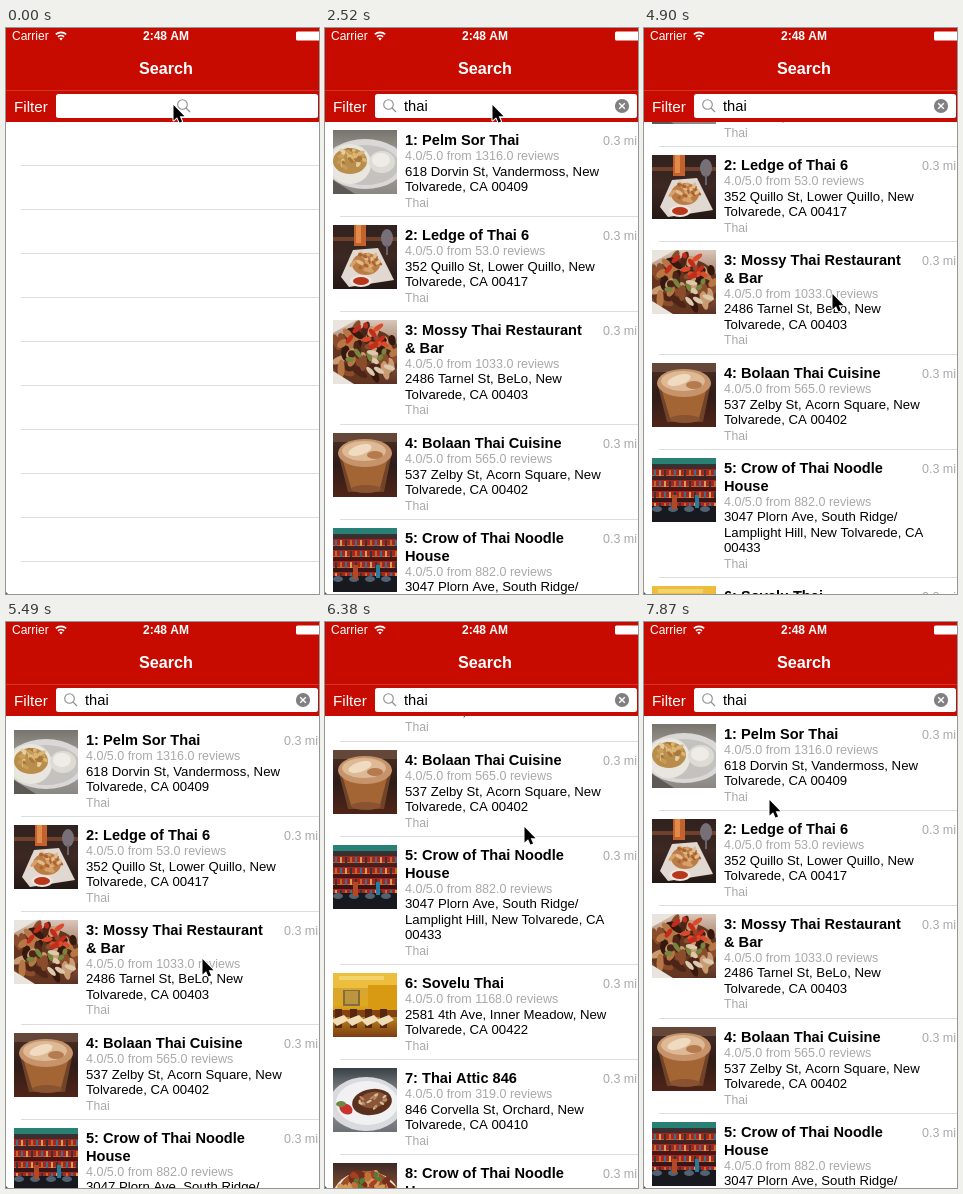
These frames come from a looping animation (313 by 566 pixels, 8000 ms). An HTML page with a canvas:

```html
<!DOCTYPE html>
<html lang="en">
<head>
<meta charset="utf-8">
<title>Search</title>
<style>
html, body { margin: 0; width: 100%; height: 100%; overflow: hidden; background: #fff; }
canvas { display: block; width: 313px; height: 566px; }
</style>
</head>
<body>
<canvas id="stage"></canvas>
<script>
const W = 313, H = 566, LOOP = 8000, TOP = 94;
const RED = '#c80b00', GRAY = '#a9a9ac', LINE = '#dddde0';
const FACE = '"Liberation Sans", Arial, sans-serif';
const canvas = document.getElementById('stage');
const dpr = window.devicePixelRatio || 1;
canvas.width = W * dpr;
canvas.height = H * dpr;
const g = canvas.getContext('2d');

function text(s, x, y, size, color, bold, align) {
  g.font = (bold ? 'bold ' : '') + size + 'px ' + FACE;
  g.fillStyle = color;
  g.textAlign = align || 'left';
  g.fillText(s, x, y);
}
function rect(c, x, y, w, h) {
  g.fillStyle = c;
  g.fillRect(x, y, w, h);
}
function oval(c, x, y, rx, ry, turn) {
  g.fillStyle = c;
  g.beginPath();
  g.ellipse(x, y, rx, ry === undefined ? rx : ry, turn || 0, 0, 7);
  g.fill();
}
function poly(c, ...p) {
  g.fillStyle = c;
  g.beginPath();
  for (let i = 0; i < p.length; i += 2) g.lineTo(p[i], p[i + 1]);
  g.closePath();
  g.fill();
}
function shade(...colors) {
  const f = g.createLinearGradient(0, 0, 0, 64);
  colors.forEach((c, i) => f.addColorStop(i / (colors.length - 1), c));
  rect(f, 0, 0, 64, 64);
}
// Scatters small flat dabs inside an ellipse.
function dabs(seed, n, colors, cx, cy, rx, ry, size) {
  const rnd = () => (seed = (seed * 16807) % 2147483647) / 2147483647;
  for (let i = 0; i < n; i++) {
    const a = rnd() * 6.28, r = Math.sqrt(rnd());
    oval(colors[i % colors.length], cx + Math.cos(a) * r * rx, cy + Math.sin(a) * r * ry,
      size * (0.6 + rnd()), size * 0.6, rnd() * 3);
  }
}

const photos = [
  () => {
    shade('#77736d', '#a9a5a0', '#8b8783');
    oval('#d9d8d6', 32, 34, 40, 25);
    oval('#c4c2bf', 32, 35, 34, 20);
    oval('#e9e6df', 17, 34, 21, 20);
    oval('#b98d4c', 17, 31, 17, 13);
    dabs(7, 30, ['#d9b674', '#e4cfa0', '#a9783a', '#c99c57'], 17, 30, 15, 11, 3);
    oval('#dedbd4', 49, 32, 13, 11);
    oval('#eeece7', 48, 30, 9, 7);
    poly('#5d5955', 0, 50, 22, 64, 0, 64);
  },
  () => {
    shade('#30221f', '#3d2822', '#241815');
    rect('#70402a', 0, 12, 64, 4);
    rect('#c3622c', 21, 0, 12, 21);
    rect('#e18b4a', 23, 0, 5, 18);
    oval('#777078', 54, 13, 6, 9);
    rect('#68636a', 53, 20, 2, 10);
    poly('#e0d8d1', 20, 25, 45, 23, 61, 55, 16, 62, 8, 52);
    oval('#bc7c46', 33, 39, 14, 11);
    dabs(19, 24, ['#d7a069', '#e2bd89', '#ad6432'], 33, 38, 13, 11, 3);
    oval('#eee4dd', 28, 56, 11, 6);
    oval('#b8371b', 28, 56, 8, 4);
  },
  () => {
    shade('#d9c7ba', '#9a6d51', '#5c3022');
    oval('#64351f', 32, 36, 35, 28);
    dabs(23, 66, ['#8a4c2b', '#b67745', '#4d2518', '#c99b72', '#36180f'], 32, 34, 32, 27, 6);
    dabs(41, 11, ['#c52b1b', '#db4a2b'], 31, 20, 26, 15, 4);
    dabs(31, 10, ['#dcc8ad', '#77853e'], 36, 41, 22, 18, 4);
    poly('#eae4df', 0, 51, 21, 64, 0, 64);
    poly('#eae4df', 0, 0, 23, 0, 0, 13);
  },
  () => {
    shade('#4b3026', '#2f1d18', '#502418');
    rect('#65473a', 0, 0, 64, 9);
    poly('#71442a', 5, 19, 59, 19, 51, 59, 15, 59);
    poly('#a46534', 10, 28, 54, 28, 47, 55, 18, 55);
    oval('#c7936a', 32, 20, 27, 14);
    oval('#ddb995', 31, 18, 22, 10);
    oval('#f0dac0', 27, 17, 12, 5, -0.3);
    oval('#b67a4f', 42, 22, 8, 4);
    oval('#895332', 33, 56, 15, 4);
  },
  () => {
    shade('#34393a', '#4a1413', '#15161b');
    rect('#298176', 0, 0, 64, 6);
    for (let y = 11; y < 46; y += 11) {
      rect('#a52521', 0, y, 64, 6);
      rect('#d25632', 0, y + 6, 64, 1);
      for (let x = 2; x < 64; x += 5)
        rect(['#be682c', '#3c7189', '#d2a056', '#37362d'][(x + y) % 4], x, y + 1, 2, 6);
    }
    rect('#17191e', 0, 48, 64, 16);
    for (let x = 5; x < 64; x += 16) oval('#536273', x, 51, 5, 3);
    rect('#b14a24', 20, 37, 5, 14);
    rect('#287ca0', 43, 37, 4, 13);
  },
  () => {
    shade('#d3a044', '#dfa91f', '#7c3d13');
    rect('#edbd3e', 0, 0, 64, 15);
    rect('#f3d36c', 6, 3, 45, 4);
    rect('#806e3e', 10, 17, 17, 16);
    rect('#bc963e', 12, 18, 13, 13);
    rect('#d99a13', 35, 12, 29, 29);
    rect('#844211', 0, 37, 64, 7);
    for (let x = 2; x < 62; x += 15) {
      rect('#57280f', x, 36, 7, 19);
      poly('#f0ddb5', x - 4, 47, x + 9, 42, x + 14, 47, x + 2, 53);
    }
  },
  () => {
    shade('#374045', '#9c9c9e', '#6d7175');
    oval('#d9dade', 33, 36, 37, 27);
    oval('#f1f1f3', 34, 35, 31, 22);
    oval('#5b301d', 39, 34, 20, 13, -0.15);
    oval('#8a5638', 40, 32, 14, 8, -0.15);
    dabs(13, 14, ['#b98b65', '#dac2a0'], 40, 32, 14, 8, 2);
    oval('#c8322f', 13, 41, 7, 5, 0.5);
    oval('#6f8741', 8, 36, 5, 3);
  },
  () => {
    shade('#3e2926', '#8f5631', '#dfd8cd');
    oval('#e8e4dc', 33, 36, 34, 28);
    oval('#9e4e25', 33, 28, 27, 20);
    dabs(37, 35, ['#bf7237', '#d59b5b', '#762f1b'], 33, 26, 26, 18, 5);
    dabs(11, 9, ['#557b36', '#a83f25'], 33, 16, 18, 9, 4);
  }
];

const rows = [
  ['Pelm Sor Thai', '1316', '618 Dorvin St, Vandermoss, New|Tolvarede, CA 00409'],
  ['Ledge of Thai 6', '53', '352 Quillo St, Lower Quillo, New|Tolvarede, CA 00417'],
  ['Mossy Thai Restaurant|& Bar', '1033', '2486 Tarnel St, BeLo, New|Tolvarede, CA 00403'],
  ['Bolaan Thai Cuisine', '565', '537 Zelby St, Acorn Square, New|Tolvarede, CA 00402'],
  ['Crow of Thai Noodle|House', '882', '3047 Plorn Ave, South Ridge/|Lamplight Hill, New Tolvarede, CA|00433'],
  ['Sovelu Thai', '1168', '2581 4th Ave, Inner Meadow, New|Tolvarede, CA 00422'],
  ['Thai Attic 846', '319', '846 Corvella St, Orchard, New|Tolvarede, CA 00410'],
  ['Crow of Thai Noodle|House', '417', '729 Brindel St, Orchard, New|Tolvarede, CA 00408']
].map(([name, reviews, address], i) => {
  const title = (i + 1 + ': ' + name).split('|');
  const lines = address.split('|');
  const height = Math.floor(95 + (title.length - 1) * 17.8 + (lines.length - 2) * 15.5 + 0.3);
  return { title, reviews, lines, height };
});

// Pose keys: time, list offset, pointer x, pointer y.
const keys = [
  [0, 0, 167, 77], [2520, 0, 167, 77], [3120, 0, 170, 150], [3420, 0, 182, 361],
  [3570, -11, 184, 350], [4010, -74, 185, 287], [4160, -80, 186, 274],
  [4600, -80, 186, 256], [4900, -70, 188, 266], [5490, 6, 196, 337],
  [5640, 18, 197, 365], [5930, 0, 198, 475], [6080, -35, 199, 440],
  [6380, -277, 199, 205], [6530, -292, 199, 190], [6680, -200, 199, 270],
  [6970, 50, 199, 453], [7120, 58, 196, 440], [7270, 22, 180, 380],
  [7420, 5, 160, 300], [7570, 0, 142, 235], [7870, 0, 125, 178]
];
// The screen refreshes only in bursts: start, interval, count.
const bursts = [
  [0, 1, 1], [290, 150, 3], [1190, 147, 3], [2520, 1, 1],
  [3120, 148.6, 8], [4600, 1, 1], [4900, 148.5, 21]
];
function tick(t) {
  const [start, gap, n] = bursts.filter(b => b[0] <= t).pop();
  const i = Math.min(n - 1, Math.floor((t - start) / gap + 0.06));
  return Math.floor((start + i * gap) / 10) * 10;
}
function pose(t) {
  const i = keys.findIndex(k => k[0] > t);
  if (i < 0) return keys[keys.length - 1].slice(1);
  const a = keys[i - 1], b = keys[i], u = (t - a[0]) / (b[0] - a[0]);
  return [1, 2, 3].map(j => Math.round(a[j] + (b[j] - a[j]) * u));
}

function drawRow(row, i, y) {
  g.save();
  g.translate(8, y + 8);
  g.beginPath();
  g.rect(0, 0, 64, 64);
  g.clip();
  photos[i]();
  g.restore();
  let base = y + 23;
  row.title.forEach((s, k) => text(s, 80, base + k * 17.5, 14.6, '#000', true));
  base += (row.title.length - 1) * 17.5 + 15.3;
  text('4.0/5.0 from ' + row.reviews + '.0 reviews', 80, base, 12.5, GRAY);
  row.lines.forEach((s, k) => text(s, 80, base + 15.5 + k * 15.5, 13.2, '#000'));
  text('Thai', 80, base + 15.2 + row.lines.length * 15.5, 12.2, GRAY);
  text('0.3 mi', 312, y + 23, 12.5, GRAY, false, 'right');
  rect(LINE, 15, y + row.height - 1, W, 1);
}

function drawList(t, offset) {
  if (t < 2520) {
    for (let y = 137; y < H; y += 44) rect(LINE, 15, y, W, 1);
    return;
  }
  let y = TOP + offset;
  rows.forEach((row, i) => {
    if (y < H && y + row.height > TOP) drawRow(row, i, y);
    y += row.height;
  });
}

function drawWifi() {
  g.strokeStyle = '#fff';
  g.lineWidth = 1.7;
  for (const r of [4.4, 7.6]) {
    g.beginPath();
    g.arc(55, 12, r, -2.32, -0.82);
    g.stroke();
  }
  g.fillStyle = '#fff';
  g.beginPath();
  g.moveTo(55, 12.4);
  g.arc(55, 12.4, 2.6, -2.32, -0.82);
  g.fill();
}

function drawHeader(t) {
  rect(RED, 0, 0, W, TOP);
  rect('#d2352b', 0, 62, W, 1);
  text('Carrier', 6, 12, 12, '#fff');
  drawWifi();
  text('2:48 AM', 160, 12, 12, '#fff', true, 'center');
  g.fillStyle = '#fff';
  g.beginPath();
  g.roundRect(290, 3.5, 27, 9, 1.5);
  g.fill();
  text('Search', 160, 46, 16.2, '#fff', true, 'center');
  text('Filter', 8, 84, 15.2, '#fff');
  g.fillStyle = '#fff';
  g.beginPath();
  g.roundRect(50, 66, 262, 24, 2.5);
  g.fill();

  const u = Math.max(0, Math.min(1, (t - 200) / 350));
  const x = Math.round(170.5 - 112.5 * u * u * (3 - 2 * u));
  g.strokeStyle = '#8e8e93';
  g.lineWidth = 1.1;
  g.beginPath();
  g.arc(x + 5.5, 76.5, 4.8, 0, 7);
  g.moveTo(x + 9, 80);
  g.lineTo(x + 13, 84);
  g.stroke();

  if (t < 1190) return;
  text('thai'.slice(0, t < 1330 ? 1 : t < 1480 ? 3 : 4), 79, 83, 14.7, '#000');
  oval('#808083', 297, 78, 7.1);
  g.strokeStyle = '#fff';
  g.lineWidth = 1.4;
  g.beginPath();
  for (const s of [-1, 1]) {
    g.moveTo(294.2, 78 - 2.8 * s);
    g.lineTo(299.8, 78 + 2.8 * s);
  }
  g.stroke();
}

const arrow = new Path2D('M0 0V15.5L3.6 12.2L6 17.6L8.6 16.4L6.2 11.2H11Z');
function drawPointer(x, y) {
  g.save();
  g.translate(x + 0.5, y);
  g.lineJoin = 'round';
  g.lineWidth = 2;
  g.strokeStyle = '#fff';
  g.stroke(arrow);
  g.fillStyle = '#000';
  g.fill(arrow);
  g.restore();
}

function frame(now) {
  const t = tick(now % LOOP);
  const [offset, px, py] = pose(t);
  g.setTransform(dpr, 0, 0, dpr, 0, 0);
  rect('#fff', 0, 0, W, H);
  drawList(t, offset);
  drawHeader(t);
  poly('#555', 0, 564, 2, 566, 0, 566);
  drawPointer(px, py);
  requestAnimationFrame(frame);
}
frame(performance.now());
</script>
</body>
</html>
```
